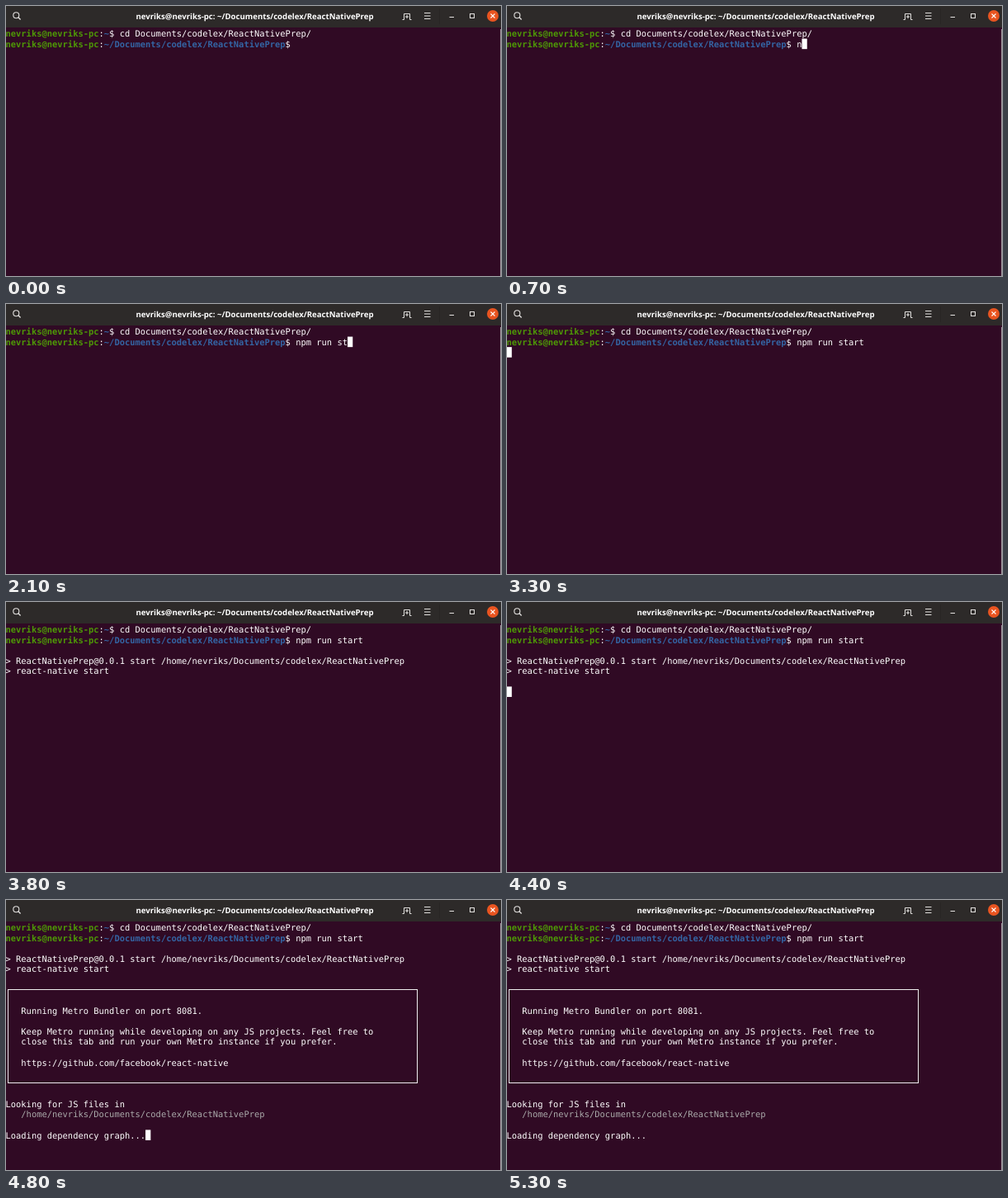
Write an HTML page with a canvas that moves like this. It is 600 by 327 pixels and loops after 5.4 s.

```html
<!DOCTYPE html>
<html lang="en">
<head>
<meta charset="utf-8">
<title>Terminal</title>
<style>
  html, body { margin: 0; width: 100%; height: 100%; overflow: hidden; background: #300a24; }
  canvas { display: block; width: 600px; height: 327px; }
</style>
</head>
<body>
<canvas id="stage" width="600" height="327"></canvas>
<script>
const ctx = document.getElementById('stage').getContext('2d');
const W = 600, H = 327, LOOP = 5400, HEADER_H = 26;
const CELL_W = 6.28, CELL_H = 12.57, LEFT = -0.5, TOP = 27, BASE = 10.1;
const MONO = '10.43px "DejaVu Sans Mono", monospace';
const WHITE = '#fff', GREEN = '#4e9a06', BLUE = '#3465a4', DIM = '#aaa';

const USER = 'nevriks';
const HOST = `${USER}@${USER}-pc`;
const PROJECT = 'Documents/codelex/ReactNativePrep';
const COMMAND = 'npm run start';

// Time at which each character of COMMAND is typed
const KEYS = [700, 800, 1000, 1200, 1300, 1400, 1400, 1500, 1900, 2100, 2300, 2700, 2900];
const ENTER = 3100, STARTED = 3500, BUNDLER = 4500;
const CURSOR_ON = 400, BLINK = 600;

const cellX = col => LEFT + col * CELL_W;
const cellY = row => TOP + row * CELL_H;

function text(row, col, str, color = WHITE, bold = false) {
  ctx.font = (bold ? 'bold ' : '') + MONO;
  ctx.fillStyle = color;
  [...str].forEach((ch, i) => {
    if (ch !== ' ') ctx.fillText(ch, cellX(col + i), cellY(row) + BASE);
  });
  return col + str.length;
}

function prompt(row, path) {
  let col = text(row, 0, HOST, GREEN, true);
  col = text(row, col, ':');
  col = text(row, col, path, BLUE, true);
  return text(row, col, '$') + 1;
}

function line(color, width, ...points) {
  ctx.strokeStyle = color;
  ctx.lineWidth = width;
  ctx.beginPath();
  points.forEach(([x, y], i) => i ? ctx.lineTo(x, y) : ctx.moveTo(x, y));
  ctx.stroke();
}

function circle(x, y, r) {
  ctx.beginPath();
  ctx.arc(x, y, r, 0, Math.PI * 2);
}

function header() {
  const icon = '#e4e2e0';
  ctx.fillStyle = '#2d2a29';
  ctx.fillRect(0, 0, W, HEADER_H);

  ctx.font = 'bold 9.62px "Open Sans", sans-serif';
  ctx.textAlign = 'center';
  ctx.fillStyle = WHITE;
  ctx.fillText(`${HOST}: ~/${PROJECT}`, 301.5, 15.8);
  ctx.textAlign = 'left';

  // Search
  ctx.strokeStyle = icon;
  ctx.lineWidth = 1.1;
  circle(12.3, 11.2, 3.5);
  ctx.stroke();
  line(icon, 1.3, [14.9, 13.8], [17.6, 16.5]);

  // New tab
  line(icon, 1, [480.5, 16.5], [482.5, 16.5], [482.5, 9.5], [489.5, 9.5], [489.5, 16.5], [491.5, 16.5]);
  line(icon, 1, [486, 11], [486, 15]);
  line(icon, 1, [484, 13], [488, 13]);

  // Menu
  for (const y of [8.5, 12, 15.5]) line(icon, 1, [507, y], [514.5, y]);
  line('#282524', 1, [525.5, 3], [525.5, 22]);

  // Window buttons
  line(icon, 1, [537.5, 13.5], [543, 13.5]);
  ctx.strokeRect(562.5, 9.5, 5, 5);
  ctx.fillStyle = '#e95420';
  circle(590, 12, 7);
  ctx.fill();
  line(WHITE, 1.1, [587.5, 9.5], [592.5, 14.5]);
  line(WHITE, 1.1, [592.5, 9.5], [587.5, 14.5]);
}

function bundlerOutput() {
  const left = Math.floor(cellX(0.5)), right = Math.floor(cellX(79.5));
  ctx.strokeStyle = '#eee';
  ctx.lineWidth = 1;
  ctx.strokeRect(left + 0.5, 108.5, right - left, 113);
  text(8, 3, 'Running Metro Bundler on port 8081.');
  text(10, 3, 'Keep Metro running while developing on any JS projects. Feel free to');
  text(11, 3, 'close this tab and run your own Metro instance if you prefer.');
  text(13, 3, 'https://github.com/facebook/react-native');
  text(17, 0, 'Looking for JS files in');
  text(18, 3, `/home/${USER}/${PROJECT}`, DIM);
  return text(20, 0, 'Loading dependency graph...');
}

// The blink restarts at the latest key press
function cursorVisible(t) {
  if (t < CURSOR_ON) return false;
  const last = [CURSOR_ON, ...KEYS, ENTER].filter(k => k <= t).pop();
  return Math.floor((t - last) / BLINK) % 2 === 0;
}

function draw(t) {
  ctx.fillStyle = '#300a24';
  ctx.fillRect(0, 0, W, H);
  // Scrollbar edge
  ctx.fillStyle = '#988c95';
  ctx.fillRect(W - 1, HEADER_H + 2, 1, H);
  header();

  text(0, prompt(0, '~'), `cd ${PROJECT}/`);
  const typed = COMMAND.slice(0, KEYS.filter(k => k <= t).length);
  let row = 1;
  let col = text(1, prompt(1, `~/${PROJECT}`), typed);

  if (t >= ENTER) {
    row = 2;
    col = 0;
  }
  if (t >= STARTED) {
    text(3, 0, `> ReactNativePrep@0.0.1 start /home/${USER}/${PROJECT}`);
    text(4, 0, '> react-native start');
    row = 6;
  }
  if (t >= BUNDLER) {
    col = bundlerOutput();
    row = 20;
  }
  if (cursorVisible(t)) {
    ctx.fillStyle = WHITE;
    ctx.fillRect(cellX(col), cellY(row), CELL_W, CELL_H);
  }
}

ctx.textRendering = 'geometricPrecision';
const start = performance.now();
function tick() {
  draw((performance.now() - start) % LOOP);
  requestAnimationFrame(tick);
}
tick();
</script>
</body>
</html>
```
